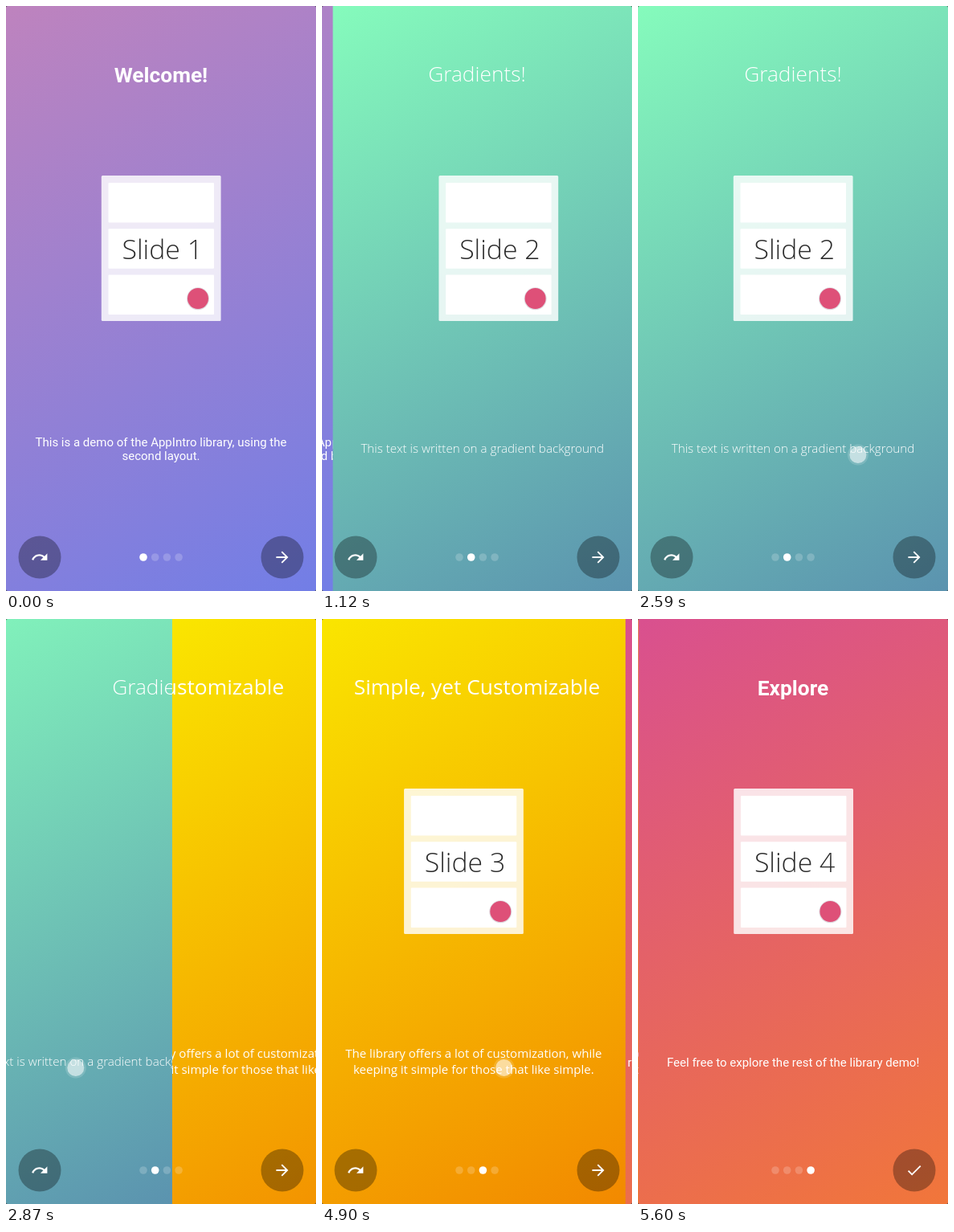
These frames come from a looping animation (386 px wide and 728 px high, 5.74 s). An HTML page with a canvas:

```html
<!DOCTYPE html>
<html lang="en">
<head>
<meta charset="utf-8">
<title>Intro slides</title>
<style>
  html, body { margin: 0; width: 100%; height: 100%; overflow: hidden; background: #444; }
  canvas { display: block; width: 386px; height: 728px; border-radius: 2px; }
</style>
</head>
<body>
<canvas id="stage"></canvas>
<script>
const W = 386, H = 728, LOOP = 5740, STEP = 70;
const canvas = document.getElementById('stage');
const ctx = canvas.getContext('2d');
const ratio = window.devicePixelRatio || 1;
canvas.width = W * ratio;
canvas.height = H * ratio;

const ROBOTO = 'Roboto, sans-serif';
const OPEN = '"Open Sans", sans-serif';
const font = (weight, size, family) => `${weight} ${size}px ${family}`;

const slides = [
  { colors: ['#be83be', '#727ee6'],
    title: 'Welcome!', titleY: 95, titleFont: font(700, 26.3, ROBOTO),
    lines: ['This is a demo of the AppIntro library, using the', 'second layout.'],
    textY: 547.5, leading: 17.7, textFont: font(400, 15.03, ROBOTO) },
  { colors: ['#85fbbc', '#5b93af'],
    title: 'Gradients!', titleY: 94.3, titleFont: font(300, 26.3, OPEN),
    lines: ['This text is written on a gradient background'],
    textY: 556, leading: 20.5, textFont: font(300, 15.2, OPEN) },
  { colors: ['#fae600', '#f28900'],
    title: 'Simple, yet Customizable', titleY: 94.3, titleFont: font(400, 26.3, OPEN),
    lines: ['The library offers a lot of customization, while', 'keeping it simple for those that like simple.'],
    textY: 545.5, leading: 20.5, textFont: font(400, 15.06, OPEN) },
  { colors: ['#d9508f', '#f1763a'],
    title: 'Explore', titleY: 95, titleFont: font(700, 26.3, ROBOTO),
    lines: ['Feel free to explore the rest of the library demo!'],
    textY: 556.5, leading: 17.7, textFont: font(400, 15.03, ROBOTO) }
];
const cardFont = font(300, 33.8, OPEN);

// Each swipe: press, drag past the touch slop, release, settle.
const swipes = [{ start: 500, x: 258 }, { start: 2520, x: 266 }, { start: 4774, x: 235 }];
const SLOP = 90, RELEASE = 360, SETTLE = 625, DRAGGED = 190;

const icons = {
  skip: new Path2D('M18.4 10.6C16.55 8.99 14.15 8 11.5 8c-4.65 0-8.58 3.03-9.96 7.22L3.9 16c1.05-3.19 4.05-5.5 7.6-5.5 1.95 0 3.73.72 5.12 1.88L13 16h9V7z'),
  next: new Path2D('M12 4l-1.41 1.41L16.17 11H4v2h12.17l-5.58 5.59L12 20l8-8z'),
  done: new Path2D('M9 16.17L4.83 12l-1.42 1.41L9 19 21 7l-1.41-1.41z')
};

function dragOffset(age) {
  if (age <= SLOP) return 0;
  if (age < RELEASE) return DRAGGED * ((age - SLOP) / (RELEASE - SLOP)) ** 1.55;
  const left = 1 - Math.min(1, (age - RELEASE) / SETTLE);
  return W - (W - DRAGGED) * left ** 5;
}

function circle(x, y, r, color) {
  ctx.fillStyle = color;
  ctx.beginPath();
  ctx.arc(x, y, r, 0, 2 * Math.PI);
  ctx.fill();
}

function box(x, y, w, h, r, color) {
  ctx.fillStyle = color;
  ctx.beginPath();
  ctx.roundRect(x, y, w, h, r);
  ctx.fill();
}

function text(string, x, y, textFont, color = '#fff', align = 'center') {
  ctx.font = textFont;
  ctx.fillStyle = color;
  ctx.textAlign = align;
  ctx.fillText(string, x, y);
}

function drawCard(x, label) {
  ctx.save();
  ctx.translate(x, 0);
  box(118.8, 210.9, 148.8, 181.2, 1.5, 'rgba(255,255,255,.83)');
  for (const y of [220, 277.2, 334.5]) box(127.5, y, 131.5, 49.5, 1, '#fff');
  text(label, 144.5, 315, cardFont, '#2b2b2b', 'left');
  circle(239, 364.3, 14, 'rgba(90,60,90,.2)');
  circle(239, 364, 13, '#de5078');
  ctx.restore();
}

function drawSlide(index, left) {
  const slide = slides[index];
  ctx.save();
  ctx.beginPath();
  ctx.rect(left, 0, W, H);
  ctx.clip();
  const fill = ctx.createLinearGradient(left, 0, left + W, H);
  slide.colors.forEach((color, i) => fill.addColorStop(i, color));
  ctx.fillStyle = fill;
  ctx.fillRect(left, 0, W, H);
  // Parallax: the title stays put, the card moves twice as far, the text half as far.
  text(slide.title, W / 2, slide.titleY, slide.titleFont);
  drawCard(left * 2, `Slide ${index + 1}`);
  slide.lines.forEach((line, i) =>
    text(line, W / 2 + left / 2, slide.textY + i * slide.leading, slide.textFont));
  ctx.restore();
}

function drawButton(x, icon) {
  circle(x, 686, 26.5, 'rgba(0,0,0,.32)');
  ctx.save();
  ctx.translate(x - 11.3, 674.7);
  ctx.scale(.94, .94);
  ctx.fillStyle = '#fff';
  ctx.fill(icons[icon]);
  ctx.restore();
}

function drawTouch(x, y) {
  circle(x, y, 13, 'rgba(255,255,255,.16)');
  circle(x, y, 10.5, 'rgba(255,255,255,.55)');
}

function draw(time) {
  ctx.setTransform(ratio, 0, 0, ratio, 0, 0);
  const scroll = swipes.reduce((sum, s) => sum + dragOffset(time - s.start), 0);
  const selected = swipes.filter(s => time >= s.start + RELEASE).length;

  slides.forEach((slide, i) => {
    const left = i * W - scroll;
    if (Math.abs(left) < W) drawSlide(i, left);
  });

  const last = selected === slides.length - 1;
  if (!last) drawButton(42, 'skip');
  drawButton(344, last ? 'done' : 'next');
  slides.forEach((slide, i) =>
    circle(171 + i * 14.7, 686, 4.8, i === selected ? '#fff' : 'rgba(255,255,255,.2)'));

  for (const { start, x } of swipes) {
    const age = time - start;
    if (age < 0 || age >= RELEASE) continue;
    const slop = 20 * (1 - Math.min(1, age / SLOP) ** 2);
    drawTouch(x + slop - dragOffset(age), 558.5);
  }
}

function tick() {
  const time = performance.now() % LOOP;
  draw(Math.floor(time / STEP) * STEP);
  requestAnimationFrame(tick);
}
tick();
</script>
</body>
</html>
```
